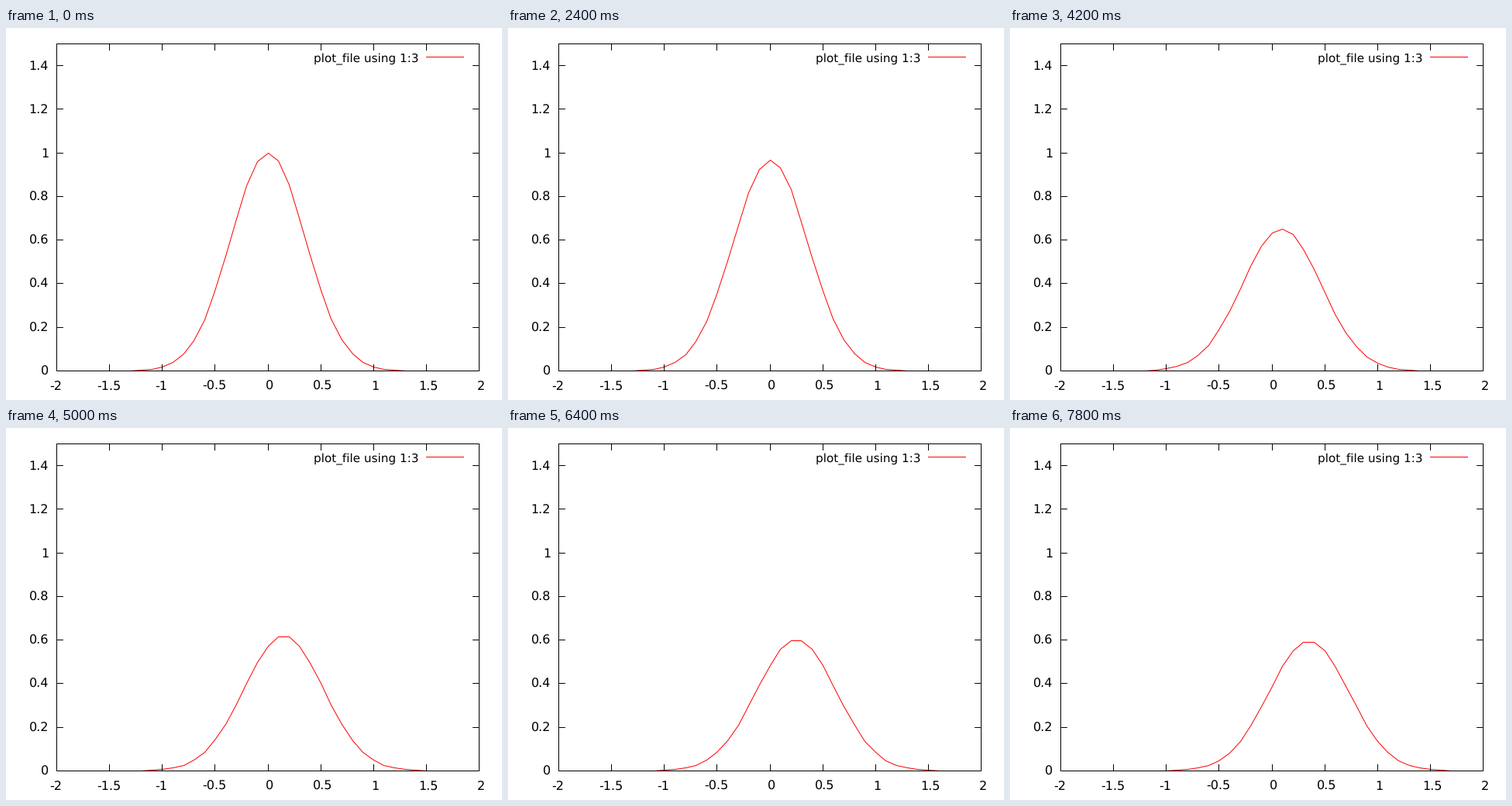
A matplotlib script that plays this animation: 640x480 px, repeating every 8 s.

```python
import numpy as np
import matplotlib.pyplot as plt
from matplotlib.animation import FuncAnimation

W, H, DPI = 640, 480, 100
LEFT, RIGHT, TOP, BOTTOM = 65, 610, 20, 442
FRAMES, STEP_MS = 40, 200
PX = 72 / DPI  # one pixel in points

plt.rcParams["font.family"] = "DejaVu Sans"
plt.rcParams["text.hinting"] = "none"


def to_x(v):
    return np.round(LEFT + (RIGHT - LEFT) * (np.asarray(v) + 2) / 4) + 0.5


def to_y(v):
    return np.round(BOTTOM - (BOTTOM - TOP) * np.asarray(v) / 1.5) + 0.5


def pulse(x, t):
    """Gaussian that loses height around step 17, then drifts right."""
    mid, width = 17.3, 2.0
    drop = 0.1374 * (np.arctan((t - mid) / width) + np.arctan(mid / width))
    u = t - 14.8
    centre = 0.00722 * (u + np.hypot(u, 2))
    return (1 - drop) * np.exp(-(4 - 1.25 * drop) * (x - centre) ** 2)


fig = plt.figure(figsize=(W / DPI, H / DPI), dpi=DPI, facecolor="white")
ax = fig.add_axes([0, 0, 1, 1])
ax.set_xlim(0, W)
ax.set_ylim(H, 0)
ax.axis("off")


def rule(xs, ys, color="black"):
    ax.plot(xs, ys, color=color, lw=PX, zorder=3, snap=False,
            solid_capstyle="butt", solid_joinstyle="miter")


def label(x, y, text, ha, size=16):
    ax.text(x, y, text, ha=ha, va="baseline", fontsize=size * PX, color="black")


l, r, top, bot = LEFT + 0.5, RIGHT + 0.5, TOP + 0.5, BOTTOM + 0.5
rule([l, r, r, l, l, r], [top, top, bot, bot, top, top])

for v in np.arange(-4, 5) / 2:
    x = to_x(v)
    rule([x, x], [bot, bot - 8.5])
    rule([x, x], [top, top + 8.5])
    label(x + (2 if v >= 0 else -1), 467, f"{v:g}", "center")

for v in np.arange(8) / 5:
    y = to_y(v)
    rule([l, l + 8.5], [y, y])
    rule([r, r - 8.5], [y, y])
    label(55, y + 5.5, f"{v:g}", "right")

label(533, 43, "plot_file using 1:3", "right", 15.3)
rule([542, 591], [37.5, 37.5], "red")

grid = np.linspace(-2, 2, 41)
curve, = ax.plot([], [], color="red", lw=PX, zorder=2, snap=False)


def draw(t):
    curve.set_data(to_x(grid), to_y(pulse(grid, t)))
    return curve,


anim = FuncAnimation(fig, draw, frames=FRAMES, interval=STEP_MS,
                     init_func=lambda: draw(0), repeat=True, repeat_delay=0)
plt.show()
```
